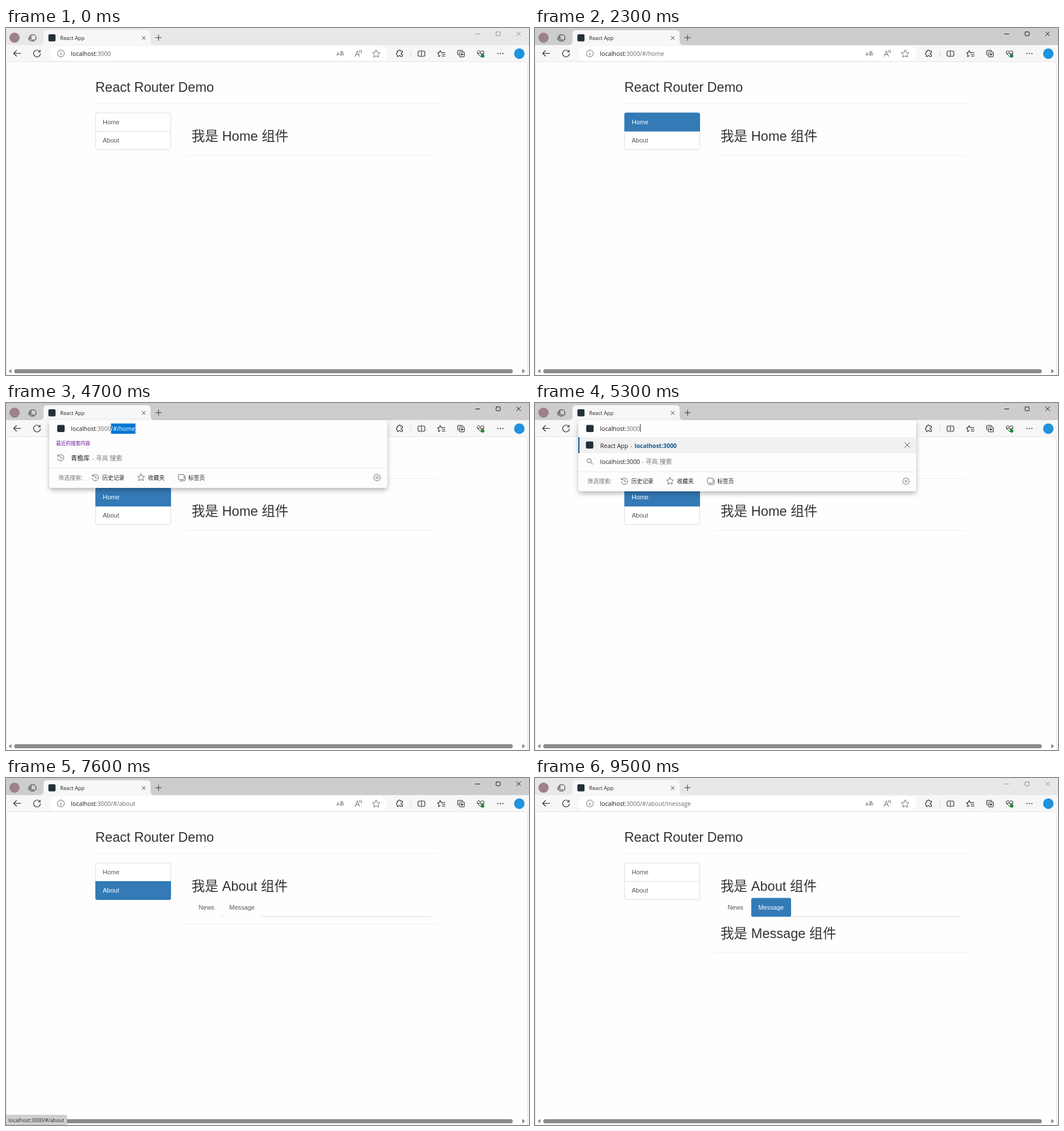
An HTML page that plays this animation: 919x609 px, repeating every 9600 ms.

```html
<!DOCTYPE html>
<html lang="zh-CN">
<head>
<meta charset="utf-8">
<title>React Router Demo</title>
<style>
  html, body { margin: 0; width: 100%; height: 100%; overflow: hidden; background: #f7f7f7; }
  svg { display: block; width: 919px; height: 609px; }
  text { white-space: pre; }
  .ui { font-family: "Open Sans", "Noto Sans CJK SC", "Noto Sans CJK", sans-serif; }
  .page { font-family: "Liberation Sans", "Noto Sans CJK SC", "Noto Sans CJK", sans-serif; }
  .line { fill: none; stroke-linecap: round; stroke-linejoin: round; }
</style>
</head>
<body>
<svg id="stage" viewBox="0 0 919 609" xmlns="http://www.w3.org/2000/svg"></svg>
<script>
const LOOP = 9600, BLUE = '#337ab7', SITE = '#22323a';
const stage = document.getElementById('stage');

// Markup helpers
const rect = (x, y, w, h, fill, r = 0, extra = '') =>
  `<rect x="${x}" y="${y}" width="${w}" height="${h}" rx="${r}" fill="${fill}" ${extra}/>`;
const path = (d, color = '#222', width = 1, extra = '') =>
  `<path class="line" d="${d}" stroke="${color}" stroke-width="${width}" ${extra}/>`;
const label = (x, y, size, fill, body, extra = '') =>
  `<text x="${x}" y="${y}" font-size="${size}" fill="${fill}" ${extra}>${body}</text>`;
const group = (id, body, extra = '') => `<g id="${id}" ${extra}>${body}</g>`;
const at = (x, y, body) => `<g transform="translate(${x} ${y})">${body}</g>`;
const hline = (x1, x2, y, color) => rect(x1, y, x2 - x1, 1, color);

function star(r) {
  const points = Array.from({ length: 10 }, (_, i) => {
    const a = Math.PI * (i / 5 - 0.5), q = i % 2 ? r * 0.5 : r;
    return (q * Math.cos(a)).toFixed(2) + ' ' + (q * Math.sin(a)).toFixed(2);
  });
  return 'M' + points.join('L') + 'Z';
}

function gear() {
  const points = Array.from({ length: 32 }, (_, i) => {
    const a = i * Math.PI / 16, r = i % 4 < 2 ? 6.2 : 4.9;
    return (r * Math.cos(a)).toFixed(2) + ' ' + (r * Math.sin(a)).toFixed(2);
  });
  return path('M' + points.join('L') + 'Z', '#777') + '<circle r="1.8" fill="none" stroke="#777"/>';
}

const cross = (r, color, width = 1) => path(`M${-r} ${-r}L${r} ${r}M${r} ${-r}L${-r} ${r}`, color, width);
const clock = path('M-4.8 -2.9A5.6 5.6 0 1 1 -5.5 1M-5.2 -5.4V-2.6H-2.4M0 -3V.5H2.6', '#666');
const sheets = path('M-3.5 -5.5H3.5Q5 -5.5 5 -4V2Q5 3.5 3.5 3.5H-3.5Q-5 3.5 -5 2V-4Q-5 -5.5 -3.5 -5.5M-3 5.8H4.5Q7 5.8 7 3.3V-3', '#666');
const lens = '<circle cx="-1.2" cy="-1.2" r="3.7" fill="none" stroke="#666"/>' + path('M1.5 1.5L5 5', '#666');

function titleBar() {
  const tab = 'M59 30Q66 30 66 23V10Q66 4 72 4H248Q254 4 254 10V23Q254 30 261 30Z';
  return rect(0, 0, 919, 30, '#cdcdcd', 0, 'id="bar"') +
    `<path d="${tab}" fill="#f7f7f7"/>` +
    '<circle cx="15" cy="17" r="9" fill="#9d8288"/>' +
    at(46.5, 17, path('M-2.5 -5H3.5L6 -2.5V3Q6 4 5 4H-1Q-2.5 4 -2.5 2.5ZM-4.5 -3.5V3.5Q-4.5 6 -2 6H3M-6.5 -1V4', '#333')) +
    rect(74.5, 11, 12.5, 12.5, SITE, 2, 'id="favicon"') +
    group('spinDots', rect(75.5, 15, 1.6, 1.6, '#555', .8) + rect(76, 19, 1.6, 1.6, '#555', .8)) +
    group('spinArc', path('M0 -5A5 5 0 0 1 4.3 2.5', '#1b74c5', 1.6)) +
    label(95, 20.5, 9.2, '#222', 'React App') +
    at(242, 17.5, cross(2.9, '#333')) +
    at(268, 17, path('M-5 0H5M0 -5V5', '#333')) +
    group('controls', path('M825 10.5H832.5M862 6.8H867Q868.3 6.8 868.3 8V12.4Q868.3 13.6 867 13.6H862.4Q861.2 13.6 861.2 12.4V8Q861.2 6.8 862.4 6.8M897.3 6.7L904.3 13.7M904.3 6.7L897.3 13.7', 'currentColor'));
}

function toolbar() {
  return rect(0, 30, 919, 30, '#f7f7f7') +
    rect(39, 33, 31, 24, '#e2e2e2', 3, 'id="hover"') +
    path('M26 44.5H13.5M18.5 39.5L13.5 44.5L18.5 49.5', '#222', 1.1) +
    group('reload', path('M59.4 41.3A6 6 0 1 0 60.5 45M60 38.8V42H56.6', '#222', 1.1)) +
    group('stop', at(54.5, 44.7, path('M-5 -5L5 5M5 -5L-5 5', 'currentColor', 1.1))) +
    rect(76, 32, 594, 25.5, '#fff', 12.75) +
    '<circle cx="96.5" cy="44.7" r="6" fill="none" stroke="#666"/>' +
    path('M96.5 44V47.6M96.5 41.6V41.7', '#666', 1.1) +
    label(580.5, 48, 9.2, '#555', 'aあ', 'id="translate"') +
    path('M613.5 50L617.3 40L621.2 50M615 46.5H619.6M621 39.2Q622.5 41 621.7 43M623.5 38.5Q625.7 41.3 624.6 44', '#666') +
    at(650.5, 45.5, path(star(7), '#666')) +
    at(692, 45, path('M-4.5 -4.5H-2Q-2.4 -6.5 -.5 -6.5Q1.4 -6.5 1 -4.5H4.5V-1.5Q2.2 -1.8 2.2 0Q2.2 1.8 4.5 1.5V5H1.3Q1.2 3.2 -.5 3.2Q-2.2 3.2 -2.3 5H-4.5V2Q-6 2 -6 .2Q-6 -1.5 -4.5 -1.5Z', '#222', 1.1)) +
    rect(711, 39, 1, 12, '#d4d4d4') +
    at(730, 45, path('M-1.8 -4.5H-4.2Q-6 -4.5 -6 -2.8V2.8Q-6 4.5 -4.2 4.5H-1.8M1.8 -4.5H4.2Q6 -4.5 6 -2.8V2.8Q6 4.5 4.2 4.5H1.8M0 -6V6', '#222', 1.1)) +
    at(765, 45, path('M2.2 -1.6L-.2 -1.9L-2 -5.5L-3.7 -1.9L-6.8 -1.5L-4.5 1.2L-5 5.3L-2 3.6M2.8 -2H6.5M1.4 1.2H6.5M1.4 4.3H6.5', '#222', 1.1)) +
    at(799.5, 45, path('M-2.2 -3H4Q5.8 -3 5.8 -1.2V4Q5.8 5.8 4 5.8H-.8Q-2.6 5.8 -2.6 4V-1.5M-4.6 2.6Q-5.8 2 -5.8 .5V-3.6Q-5.8 -5.8 -3.6 -5.8H1Q2.5 -5.8 3 -4.8M1.6 -.8V3.6M-.6 1.4H3.8', '#222', 1.1)) +
    at(834, 45, path('M0 5.2L-5.2 0Q-7 -2.5 -5 -4.4Q-2.5 -6.2 0 -3.3Q2.5 -6.2 5 -4.4Q7 -2.5 5.2 0ZM-5.6 -.3H-2.4L-1 -2.3L1 1.8L2.2 -.3H5', '#222') + '<circle cx="3.6" cy="4" r="3" fill="#128a3a"/>') +
    [864.5, 868.8, 873.1].map(x => `<circle cx="${x}" cy="44.7" r="1" fill="#222"/>`).join('') +
    '<circle cx="902" cy="45" r="9.2" fill="#1f93dd"/>';
}

function listItem(key, name, d, y) {
  return `<path id="${key}Fill" d="${d}" fill="${BLUE}"/>` + label(170, y, 11, '#555', name, `id="${key}Text"`);
}

function tabItem(key, name, x, w) {
  return rect(x, 210.5, w, 33, BLUE, 3, `id="${key}Fill"`) + label(x + 12.6, 231, 11, '#555', name, `id="${key}Text"`);
}

function page() {
  return '<path d="M.5 610V66Q.5 59 7.5 59H909.5Q916.5 59 916.5 66V610" fill="#fefefe" stroke="#e2e2e2"/>' +
    group('content',
      label(157, 112, 23.6, '#333', 'React Router Demo') +
      hline(157, 759, 132, '#eee') +
      rect(157.5, 149, 132, 64.5, '#fff', 3, 'stroke="#ddd"') +
      hline(158, 289, 181, '#ddd') +
      listItem('home', 'Home', 'M157 181.5V152Q157 148.5 160.5 148.5H286.5Q290 148.5 290 152V181.5Z', 169) +
      listItem('about', 'About', 'M157 181V210.5Q157 214 160.5 214H286.5Q290 214 290 210.5V181Z', 201) +
      label(326, 198, 23.6, '#333', '', 'id="heading"') +
      group('tabs',
        hline(326, 328, 243, '#e4e4e4') + hline(377, 382, 243, '#ddd') + hline(448, 747, 243, '#ddd') +
        tabItem('news', 'News', 326, 52) + tabItem('message', 'Message', 380, 70)) +
      label(326, 281, 23.6, '#333', '', 'id="subheading"') +
      rect(316, 223, 441, 1, '#eee', 0, 'id="rule"'), 'class="page"') +
    rect(14.5, 598.7, 876, 7.4, '#8b8b8b', 3.7) +
    '<path d="M9.5 598.5V606L4.5 602.2ZM907 598.5V606L912.5 602.2Z" fill="#8b8b8b"/>' +
    group('bubble', '<path id="bubbleBox" fill="#cfcfcf" stroke="#c2c2c2" stroke-width=".6"/>' +
      label(4.5, 603.7, 9, '#222', '', 'id="bubbleText"'));
}

function footer(y) {
  const item = (x, icon, name) => at(x, y, icon) + label(x + 12.3, y + 3.5, 9.7, '#222', name);
  return hline(76, 670, y - 17, '#e9e9e9') + label(92, y + 3.5, 10, '#777', '筛选搜索:') +
    item(157, clock, '历史记录') + item(237.3, path(star(6.5), '#666'), '收藏夹') +
    item(308, sheets, '标签页') + at(652, y, gear());
}

const searchWith = (x, y) => label(x, y, 11, '#767676', '- 寻岚 搜索');

function popup() {
  return group('popup',
    rect(76, 30, 594, 119, '#fdfdfd', 5, 'id="popupBox" filter="url(#shadow)"') +
    rect(90, 38.5, 13, 12.5, SITE, 2) +
    group('recent',
      label(88, 74, 8.6, '#6d1e9c', '最近的搜索内容') +
      at(96, 96, clock) + label(114, 101, 11, '#222', '青檐库') + searchWith(151, 101) + footer(131)) +
    group('matches',
      rect(76, 60, 594, 28, '#f1f1f1') + rect(76, 60, 2.2, 28, '#13609f') +
      rect(89.5, 67.5, 13, 12.5, SITE, 2) +
      label(114.5, 78.7, 10.5, '#222', 'React App') + label(167.5, 78.7, 10.5, '#555', '-') +
      label(175, 78.7, 10.4, '#0f5c97', 'localhost:3000', 'font-weight="700"') +
      at(654, 74, cross(4.3, '#555')) +
      at(96.5, 102.5, lens) + label(114.5, 107, 10.4, '#222', 'localhost:3000') + searchWith(187.5, 107) + footer(137.3)));
}

const addressText = (body, id) => label(114.3, 48.6, 10.4, '#1a1a1a', body, id);

stage.innerHTML = '<defs><filter id="shadow" x="-10%" y="-20%" width="120%" height="150%">' +
  '<feDropShadow dx="0" dy="4" stdDeviation="4.5" flood-opacity=".28"/></filter>' +
  '<clipPath id="picked"><rect id="pickedBox" y="36" height="18"/></clipPath></defs>' +
  group('ui', titleBar() + toolbar() + page() + popup() +
    addressText('', 'id="address"') +
    group('selection', rect(114, 36, 130, 18, '#0078d4') + label(114.3, 48.6, 10.4, '#fff', '', 'id="addressPicked"'), 'clip-path="url(#picked)"') +
    rect(227.8, 37, 1, 14, '#222', 0, 'id="caret"'), 'class="ui"');

const el = {};
stage.querySelectorAll('[id]').forEach(node => { el[node.id] = node; });
const show = (id, on) => { el[id].style.display = on ? '' : 'none'; };
const put = (id, body) => { if (el[id].textContent !== body) el[id].textContent = body; };
const set = (id, name, value) => el[id].setAttribute(name, value);

// Last value whose start time has been reached
const pick = (t, steps) => steps.reduce((value, [start, next]) => t >= start ? next : value, null);
const between = (t, a, b) => t >= a && t < b;

const HOST = 'localhost';
const routes = [[0, ''], [1500, '/#/home'], [5300, ''], [6400, '/#/home'], [7600, '/#/about'], [8400, '/#/about/news'], [8600, '/#/about/message']];
const bubbleStates = [
  [0, ['', 0, 0]], [1100, ['正在连接...', 304, .6]], [1200, ['正在连接...', 304, 1]],
  [1800, ['正在连接...', 304, .6]], [1900, ['正在连接...', 304, .25]], [2000, ['', 0, 0]],
  [2900, ['localhost:3000/#/about', 107, .6]], [3000, ['localhost:3000/#/about', 107, .9]], [3100, ['', 0, 0]],
  [7600, ['localhost:3000/#/about', 107, 1]], [8100, ['localhost:3000/#/about/news', 120, 1]],
  [8200, ['localhost:3000/#/about/news', 132, 1]], [8400, ['localhost:3000/#/about/message', 147, 1]],
  [9000, ['localhost:3000/#/about/message', 147, .6]], [9100, ['localhost:3000/#/about/message', 147, .25]], [9200, ['', 0, 0]]
];
const selectionStarts = [[0, 0], [3800, 219], [3900, 207], [4000, 195], [4100, 184.5], [4300, 178.5], [4400, 189], [4700, 184.5], [5300, 0]];

function markItem(key, active, hovered) {
  show(key + 'Fill', active || hovered);
  set(key + 'Fill', 'fill', active ? BLUE : '#eee');
  set(key + 'Text', 'fill', active ? '#fff' : '#555');
}

function update(time) {
  const t = Math.floor(time / 100) * 100;
  const focused = between(t, 700, 9500);
  set('bar', 'fill', focused ? '#cdcdcd' : '#e8e8e8');
  el.controls.style.color = focused ? '#111' : '#8c8c8c';

  const loading = between(t, 1100, 1800) || between(t, 6300, 6400);
  const arc = between(t, 1400, 1800) || between(t, 6300, 6400);
  show('favicon', !loading);
  show('spinDots', loading && !arc);
  show('spinArc', arc);
  set('spinArc', 'transform', `translate(80.5 17) rotate(${t * .36 % 360})`);

  const stopping = between(t, 1600, 2300) || between(t, 6300, 6400);
  show('reload', !stopping);
  show('stop', stopping);
  el.stop.style.color = between(t, 1800, 2300) ? '#aaa' : '#222';
  set('hover', 'opacity', pick(t, [[0, 0], [800, .5], [900, 1], [1800, .5], [1900, 0]]));
  show('translate', !between(t, 1400, 1600));

  const route = pick(t, routes);
  const rest = ':3000' + route;
  if (el.address.dataset.rest !== rest) {
    el.address.dataset.rest = rest;
    el.address.innerHTML = `${HOST}<tspan fill="#6b6b6b">${rest}</tspan>`;
  }
  put('addressPicked', HOST + rest);
  const start = pick(t, selectionStarts);
  show('selection', start > 0);
  set('pickedBox', 'x', start);
  set('pickedBox', 'width', start ? 227.5 - start : 0);
  show('caret', t === 3700 || between(t, 5300, 5800));
  set('caret', 'x', t < 5000 ? 227.8 : 184.7);

  show('popup', between(t, 3700, 6300));
  show('recent', t < 5300);
  show('matches', t >= 5300);
  set('popupBox', 'height', t < 5300 ? 119 : 125);

  const onAbout = t >= 7600, child = pick(t, [[0, ''], [8400, 'News'], [8600, 'Message']]);
  markItem('home', between(t, 1500, 7600), false);
  markItem('about', between(t, 7600, 8400), false);
  markItem('news', child === 'News', between(t, 8100, 8400));
  markItem('message', child === 'Message', between(t, 8400, 8600));
  put('heading', `我是 ${onAbout ? 'About' : 'Home'} 组件`);
  put('subheading', child && `我是 ${child} 组件`);
  show('tabs', onAbout);
  set('rule', 'y', child ? 305.5 : onAbout ? 256 : 223);

  const [message, width, opacity] = pick(t, bubbleStates);
  put('bubbleText', message);
  set('bubble', 'opacity', opacity);
  set('bubbleBox', 'd', `M0 609V591.5H${width - 3}Q${width} 591.5 ${width} 594.5V609Z`);
}

const began = performance.now();
function tick() {
  update((performance.now() - began) % LOOP);
  requestAnimationFrame(tick);
}
tick();
</script>
</body>
</html>
```
